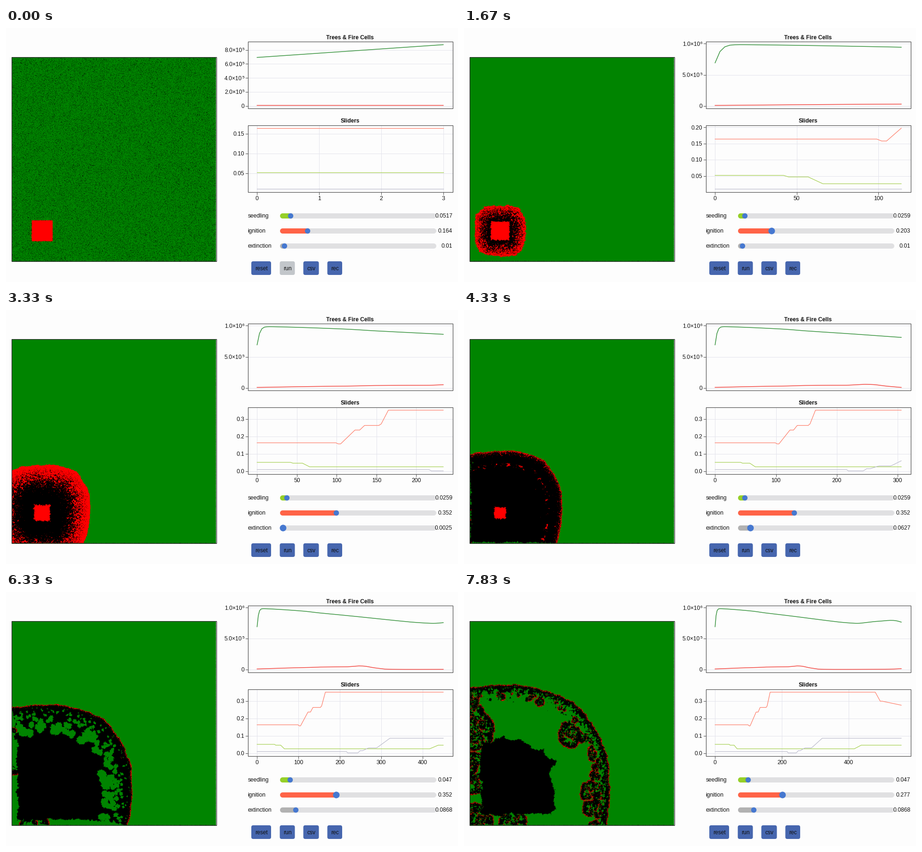
These frames come from a looping animation (960x540 px, 8 s). A matplotlib script:

```python
import math
import numpy as np
import matplotlib.pyplot as plt
from matplotlib.animation import FuncAnimation
from matplotlib.patches import FancyBboxPatch, Rectangle

W, H, DPI = 960, 540, 100
PX = 72 / DPI
LOOP, TICK = 8000, 100
RATE = 6  # pictures per second
VIEWS_SHOWN = LOOP * RATE // 1000
N, VIEW = 1000, 434
EMPTY, TREE, FIRE = 0, 1, 2

PAPER, INK, SPINE, GRID = "#fdfdfd", "#101010", "#505050", "#e4e4ec"
TRACK, KNOB, BLUE, PRESSED = "#e0e0e2", "#4678d0", "#4666ae", "#c2c6ca"

plt.rcParams["font.family"] = ["Liberation Sans", "DejaVu Sans"]

# each slider: start value, then drags as (first step, last step, new value)
SLIDERS = [
    (.0517, [(42, 45, .047), (57, 66, .0259), (417, 438, .047)]),
    (.164, [(99, 102, .158), (105, 123, .2375), (129, 135, .264),
            (155, 165, .352), (480, 495, .3), (501, 558, .277)]),
    (.01, [(216, 219, .0025), (244, 249, .015), (255, 269, .031),
           (289, 321, .0868)]),
]


def setting(slider, step):
    value, drags = slider
    for start, end, goal in drags:
        value += (goal - value) * min(max((step - start) / (end - start), 0), 1)
    return value


def settings(step):
    return [setting(s, step) for s in SLIDERS]


def is_held(slider, step):
    return any(start - 30 <= step <= end + 10 for start, end, _ in slider[1])


def last_step(view):
    return max(3, 12 * view - 6)


# --- forest: trees spread into gaps, fire into trees, and fire dies at its edge ---
rng = np.random.default_rng(12)
CODE = np.array([1, 16, 256], dtype=np.uint16)
KEYS = np.arange(3 << 12)
STATE = KEYS >> 12
NEAR_TREE, NEAR_FIRE = (KEYS >> 4) & 15, (KEYS >> 8) & 15
CONTACTS = np.choose(STATE, [NEAR_TREE, NEAR_FIRE, np.maximum(9 - NEAR_FIRE, 0)])


def advance(cells, rates, size):
    area = cells[:size, :size]
    inner = area[1:-1, 1:-1]
    code = CODE[area]
    rows = code[:-2] + code[1:-1] + code[2:]
    key = rows[:, :-2] + rows[:, 1:-1] + rows[:, 2:]
    key += inner.astype(np.uint16) << 12
    chance = 1 - (1 - np.array(rates)[STATE]) ** CONTACTS
    limit = (chance * 65535).astype(np.uint16)
    inner += rng.integers(0, 65536, key.shape, dtype=np.uint16) < limit[key]
    inner *= inner < 3


def snapshot(cells):
    pick = ((np.arange(2 * VIEW) + .5) * N / (2 * VIEW)).astype(int)
    fine = cells[np.ix_(pick, pick)].reshape(VIEW, 2, VIEW, 2)
    image = np.zeros((VIEW, VIEW, 3), dtype=np.uint8)
    image[..., 0] = (fine == FIRE).mean(axis=(1, 3)) * 255
    image[..., 1] = (fine == TREE).mean(axis=(1, 3)) * 132
    return image


def simulate():
    cells = (rng.random((N, N)) < .7).astype(np.uint8)
    cells[99:200, 99:200] = FIRE
    shown = {last_step(v) for v in range(VIEWS_SHOWN)}
    views, trees, fires = {}, [], []
    for step in range(last_step(VIEWS_SHOWN - 1) + 1):
        if step:
            # beyond the reach of the fire the forest is soon complete
            size = N if step < 40 else min(N, 210 + step)
            advance(cells, settings(step), size)
        if step % 3 == 0:
            trees.append(np.count_nonzero(cells == TREE))
            fires.append(np.count_nonzero(cells == FIRE))
        if step in shown:
            views[step] = snapshot(cells)
    return views, np.array(trees), np.array(fires)


VIEWS, TREES, FIRES = simulate()
STEPS = 3 * np.arange(len(TREES))
SETTINGS = np.array([settings(s) for s in STEPS]).T


# --- axis ticks ---
def find_ticks(lo, hi):
    best, result = -1, ([], 1)
    top = math.floor(math.log10(hi - lo))
    for q, nice in ((1, 1), (5, .9), (2, .7), (2.5, .5), (3, .2)):
        for power in (top, top - 1):
            gap = q * 10.0 ** power
            first, last = math.ceil(lo / gap), math.floor(hi / gap)
            count = last - first + 1
            if not 3 <= count < 10:
                continue
            score = (.25 * (1 - abs(count - 5) / 5) + .25 * nice
                     + .5 * (hi - lo) / (gap * (count - 1)))
            if score > best + 1e-9:
                best = score
                result = [k * gap for k in range(first, last + 1)], gap
    return result


def decimals(gap):
    return next(d for d in range(8) if abs(round(gap, d) - gap) < 1e-9)


def limits(low, high):
    pad = .05 * (high - low)
    return low - pad, high + pad


# --- stage ---
fig = plt.figure(figsize=(W / DPI, H / DPI), dpi=DPI, facecolor=PAPER)
ax = fig.add_axes([0, 0, 1, 1])
ax.axis("off")

LEFT, RIGHT = 513.5, 948.5
TOP_BOX, LOW_BOX = (29, 171), (206.5, 348.5)
moving = []


def text(x, y, label, ha="left", size=12, **style):
    return ax.text(x, y, label, ha=ha, va="baseline", color=INK,
                   fontsize=size * PX, zorder=6, **style)


def line(x, y, color, width=1.0, z=3, **style):
    return ax.plot(x, y, color=color, lw=width * PX, zorder=z, **style)[0]


def frame_box(x0, y0, x1, y1, color=SPINE):
    ax.add_patch(Rectangle((x0, y0), x1 - x0, y1 - y0, fill=False, ec=color,
                           lw=1.2 * PX, zorder=5))


def bar(x0, x1, y, color, z):
    return line([x0, x1], [y, y], color, 11, z, solid_capstyle="round")


def button(x0, x1, label):
    patch = FancyBboxPatch((x0, 496), x1 - x0, 29, fc=BLUE, ec="none",
                           boxstyle="round,pad=0,rounding_size=4", zorder=3)
    ax.add_patch(patch)
    text((x0 + x1) / 2, 515, label, "center")
    return patch


forest = ax.imshow(VIEWS[3], extent=(12, 446, 496, 62), origin="lower",
                   interpolation="nearest", aspect="auto", zorder=2)
frame_box(11.5, 61.5, 446.5, 495.5, "#202020")
frame_box(LEFT, TOP_BOX[0], RIGHT, TOP_BOX[1])
frame_box(LEFT, LOW_BOX[0], RIGHT, LOW_BOX[1])
text(731, 24, "Trees & Fire Cells", "center", weight="bold")
text(731, 201, "Sliders", "center", weight="bold")

fire_line = line([], [], "#f24a44", 1.5)
tree_line = line([], [], "#3a9440", 1.5)
setting_lines = [line([], [], c, 1.2) for c in ("#a6d050", "#ff7c68", "#bcbccc")]

BAR_X, BAR_LEN = 587.4, 321.6
fills, knobs, values = [], [], []
for name, row, color in (("seedling", 398.5, "#96d028"),
                         ("ignition", 430.5, "#ff6347"),
                         ("extinction", 462.5, "#b2b2b2")):
    text(513.5, row + 4.3, name)
    bar(BAR_X, 908, row, TRACK, 2)
    fills.append(bar(BAR_X, BAR_X, row, color, 3))
    knobs.append(line([BAR_X], [row], KNOB, 0, 4, marker="o", mew=0))
    values.append(text(948, row + 4.3, "", "right"))

button(521, 563, "reset")
run = button(581.5, 613.5, "run")
button(631.5, 664.5, "csv")
button(682.5, 714, "rec")

ax.set_xlim(0, W)
ax.set_ylim(H, 0)


def scale(value, lo, hi, start, end):
    return start + (np.asarray(value) - lo) / (hi - lo) * (end - start)


def y_axis(lo, hi, box, scientific=False):
    marks, gap = find_ticks(lo, hi)
    for mark in marks:
        y = float(scale(mark, lo, hi, box[1], box[0]))
        moving.append(line([LEFT, RIGHT], [y, y], GRID, 1, 1))
        moving.append(line([LEFT - 5, LEFT], [y, y], SPINE))
        if not scientific:
            moving.append(text(506, y + 4.3, f"{mark:.{decimals(gap)}f}", "right"))
        elif mark == 0:
            moving.append(text(506, y + 4.3, "0", "right"))
        else:
            power = math.floor(math.log10(mark) + 1e-9)
            base = f"{mark / 10 ** power:.1f}×10"
            moving.append(text(501.3, y + 4.3, base, "right"))
            moving.append(text(506, y + .3, str(power), "right", 8.5))


def x_axis(lo, hi):
    marks, gap = find_ticks(lo, hi)
    for mark in marks:
        x = float(scale(mark, lo, hi, LEFT, RIGHT))
        moving.append(line([x, x], LOW_BOX, GRID, 1, 1))
        moving.append(line([x, x], [LOW_BOX[1], LOW_BOX[1] + 5], SPINE))
        moving.append(text(x, 366.5, f"{mark:.{decimals(gap)}f}", "center"))


def draw(frame):
    while moving:
        moving.pop().remove()
    # the small lead lets each picture start on the nearest tick before it
    view = int((frame * TICK + 70) * RATE / 1000)
    step = last_step(min(view, VIEWS_SHOWN - 1))
    count = step // 3 + 1
    forest.set_data(VIEWS[step])

    x_lim = limits(0, step)
    xs = scale(STEPS[:count], *x_lim, LEFT, RIGHT)
    x_axis(*x_lim)

    y_lim = limits(FIRES[:count].min(), TREES[:count].max())
    y_axis(*y_lim, TOP_BOX, scientific=True)
    for curve, data in ((tree_line, TREES), (fire_line, FIRES)):
        curve.set_data(xs, scale(data[:count], *y_lim, TOP_BOX[1], TOP_BOX[0]))

    past = SETTINGS[:, :count]
    y_lim = limits(past.min(), past.max())
    y_axis(*y_lim, LOW_BOX)
    for curve, data in zip(setting_lines, past):
        curve.set_data(xs, scale(data, *y_lim, LOW_BOX[1], LOW_BOX[0]))

    for slider, fill, knob, label in zip(SLIDERS, fills, knobs, values):
        value = setting(slider, step + 1.2)
        x = BAR_X + BAR_LEN * value
        fill.set_xdata([BAR_X, x])
        knob.set_xdata([x])
        knob.set_markersize((14 if is_held(slider, step) else 11.4) * PX)
        label.set_text(f"{value:.3g}")
    run.set_facecolor(PRESSED if view < 2 else BLUE)
    return []


anim = FuncAnimation(fig, draw, frames=LOOP // TICK, interval=TICK,
                     repeat=True, blit=False)
plt.show()
```
